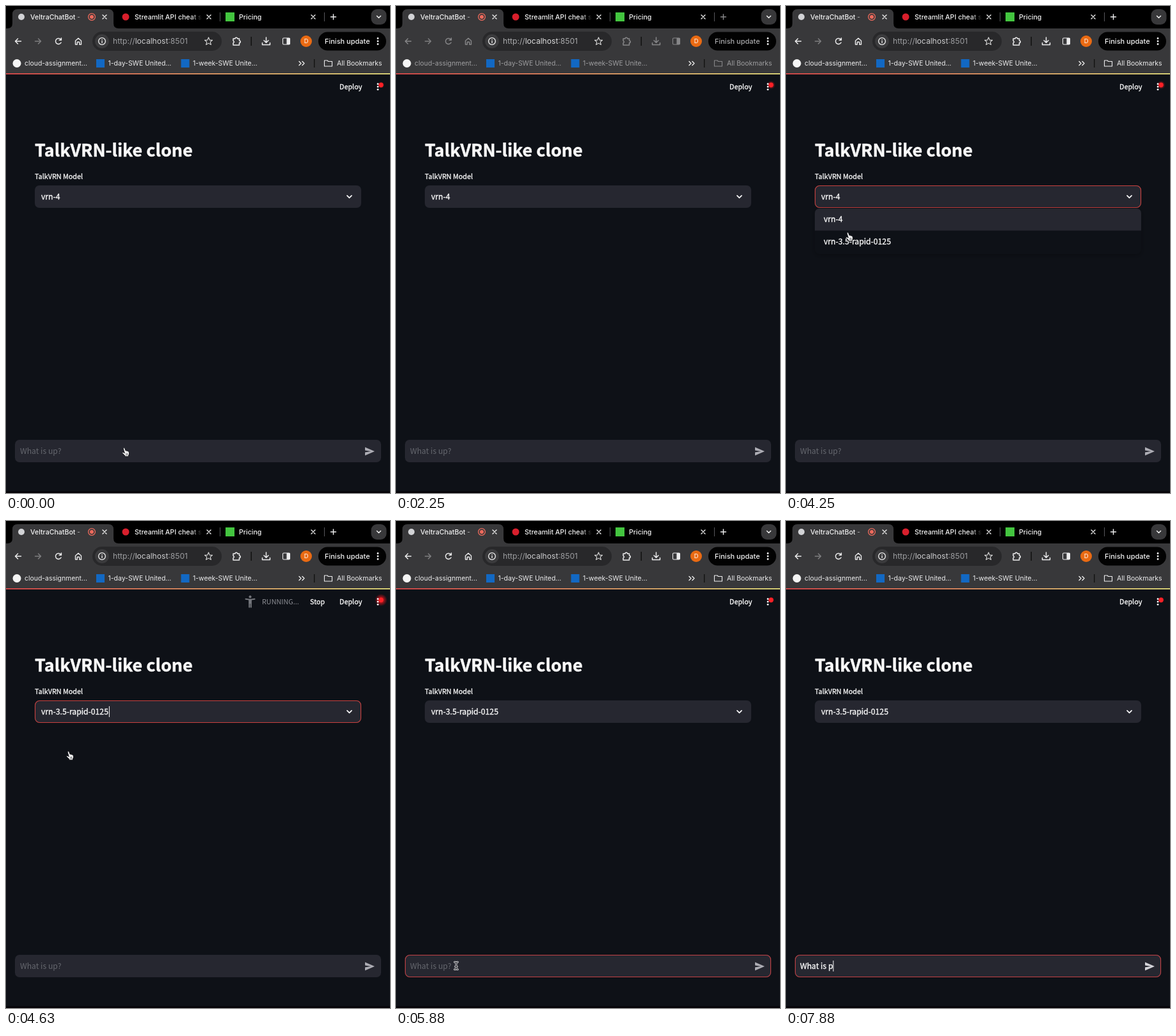
These frames come from a looping animation (600x760 px, 8000 ms). An HTML page with a canvas:

```html
<!DOCTYPE html>
<html lang="en">
<head>
<meta charset="utf-8">
<title>Chat clone demo</title>
<style>
  html, body { margin: 0; width: 100%; height: 100%; overflow: hidden; background: #000; }
  canvas { display: block; width: 600px; height: 760px; }
</style>
</head>
<body>
<canvas id="stage"></canvas>
<script>
const W = 600, H = 760, LOOP = 8000, STEP = 125;
const UI = 'Inter, Roboto, sans-serif';
const APP = '"Noto Sans CJK JP", "Noto Sans CJK SC", "Noto Sans CJK", "Noto Sans", sans-serif';
const PAGE = '#0e1117', FIELD = '#262730', BAR = '#38383a', INK = '#fafafa';
const BODY = 12.2, SMALL = 10.8;
const MODELS = ['vrn-4', 'vrn-3.5-rapid-0125'];

// Story times in ms
const BLUR = 750, REFOCUS = 2500;
const OPEN = 3625, HOVER = 4375, PICK = 4500, DONE = 5000, FOCUS_AT = 5375;
const KEYS = [6125, 6250, 6375, 6500, 6750, 6875, 7125, 7375, 7750];
const TYPED = 'What is p';

// Pointer path: time, x, y
const PATH = [
  [500, 187, 696], [875, 70, 716], [2375, 62, 690], [2875, 108, 331], [3125, 108, 331],
  [3500, 102, 302], [3750, 101, 306], [4250, 99, 360], [4500, 100, 366], [4875, 100, 366],
  [5375, 94, 694]
];

const canvas = document.getElementById('stage');
const ctx = canvas.getContext('2d');
const dpr = window.devicePixelRatio || 1;
canvas.width = W * dpr;
canvas.height = H * dpr;

function rect(x, y, w, h, color) {
  ctx.fillStyle = color;
  ctx.fillRect(x, y, w, h);
}

function box(x, y, w, h, r, fill, line) {
  if (fill) {
    ctx.beginPath();
    ctx.roundRect(x, y, w, h, r);
    ctx.fillStyle = fill;
    ctx.fill();
  }
  if (line) {
    ctx.beginPath();
    ctx.roundRect(x + 0.5, y + 0.5, w - 1, h - 1, r);
    ctx.strokeStyle = line;
    ctx.lineWidth = 1.1;
    ctx.stroke();
  }
}

function disc(x, y, r, color) {
  ctx.beginPath();
  ctx.arc(x, y, r, 0, 7);
  ctx.fillStyle = color;
  ctx.fill();
}

function ring(x, y, r, color, width = 1.2) {
  ctx.beginPath();
  ctx.arc(x, y, r, 0, 7);
  ctx.strokeStyle = color;
  ctx.lineWidth = width;
  ctx.stroke();
}

function text(str, x, y, size, color, family = APP, weight = 400) {
  ctx.font = `${weight} ${size}px ${family}`;
  ctx.fillStyle = color;
  ctx.fillText(str, x, y);
  return x + ctx.measureText(str).width;
}

// Page text, slightly emboldened with a hairline
function appText(str, x, y, size, color = INK, weight = 400) {
  const end = text(str, x, y, size, color, APP, weight);
  ctx.strokeStyle = color;
  ctx.lineWidth = 0.2 + size / 100;
  ctx.lineJoin = 'round';
  ctx.strokeText(str, x, y);
  return end;
}

function icon(x, y, d, color, { width = 1.5, fill = null } = {}) {
  const shape = new Path2D(d);
  ctx.save();
  ctx.translate(x, y);
  ctx.lineCap = ctx.lineJoin = 'round';
  if (fill) { ctx.fillStyle = fill; ctx.fill(shape); }
  if (color) { ctx.strokeStyle = color; ctx.lineWidth = width; ctx.stroke(shape); }
  ctx.restore();
}

function fade(from, to) {
  const g = ctx.createLinearGradient(from, 0, to, 0);
  g.addColorStop(0, '#f1f1f1');
  g.addColorStop(1, 'rgba(241,241,241,0)');
  return g;
}

const cross = x => icon(x, 17, 'M-3-3L3 3M3-3L-3 3', '#eee', { width: 1.4 });

function dots(x, y, gap, r, color) {
  for (let i = -1; i < 2; i++) disc(x, y + i * gap, r, color);
}

function drawTabs(tone) {
  rect(0, 0, W, 36, '#000');
  ctx.beginPath();
  ctx.moveTo(2, 35);
  ctx.quadraticCurveTo(10, 35, 10, 27);
  ctx.lineTo(10, 13);
  ctx.quadraticCurveTo(10, 5, 18, 5);
  ctx.lineTo(160, 5);
  ctx.quadraticCurveTo(168, 5, 168, 13);
  ctx.lineTo(168, 27);
  ctx.quadraticCurveTo(168, 35, 176, 35);
  ctx.fillStyle = BAR;
  ctx.fill();

  disc(24, 17, 5, '#d2d3d6');
  text('VeltraChatBot -', 38, 21, 10.6, fade(108, 121), UI, 500);
  ring(134, 17, 5.4, '#ee6a5c', 1.3);
  disc(134, 17, 3, '#ee6a5c');
  cross(154);

  disc(187, 17, 5.5, '#d81f2c');
  text('Streamlit API cheat sheet', 201, 21, 10.6, fade(290, 306), UI, 500);
  cross(317);
  rect(334, 10, 1, 14, '#55565a');

  rect(343, 10, 14, 14, '#43c53f');
  text('Pricing', 364, 21, 10.6, '#f1f1f1', UI, 500);
  cross(480);
  rect(497, 10, 1, 14, '#55565a');

  icon(511.5, 17, 'M-4 0H4M0-4V4', tone, { width: 1.5 });
  box(570.5, 5, 24, 24, 9, BAR);
  icon(582.5, 17, 'M-3-1.5L0 1.5L3-1.5', '#eee');
}

function drawToolbar(active, tone) {
  rect(0, 35, W, 70, BAR);
  icon(19, 55, 'M4.5 0H-4.5M-.5-4L-4.5 0L-.5 4', tone);
  icon(50, 55, 'M-4.5 0H4.5M.5-4L4.5 0L.5 4', '#7d7d7f');
  icon(82, 55, 'M4 2A4.5 4.5 0 1 1 3.4-3M4.4-5V-1.8H1.2', tone);
  icon(113, 55, 'M-4.5-.8L0-4.8L4.5-.8V5H1.7V1.2H-1.7V5H-4.5Z', tone, { width: 1.4 });

  box(135, 40, 202, 30, 15, '#28282a');
  disc(150, 55, 11, '#3b3b3d');
  ring(150, 55, 5.4, '#eee', 1.3);
  rect(149.4, 54, 1.3, 4, '#eee');
  rect(149.4, 51.8, 1.3, 1.3, '#eee');
  const dim = active ? '#9c9da0' : '#aaabad';
  let x = text('http://', 167, 59.3, 12.1, dim, UI);
  x = text('localhost', x, 59.3, 12.1, active ? '#cdcdcf' : '#dcdcdd', UI);
  text(':8501', x, 59.3, 12.1, dim, UI);
  icon(316.5, 55, 'M0-6L1.7-1.9L6-1.6L2.7 1.2L3.8 5.4L0 3.1L-3.8 5.4L-2.7 1.2L-6-1.6L-1.7-1.9Z', '#ddd', { width: 1.1 });

  icon(360, 55, 'M-5-4H-2A1.8 1.8 0 0 1 1.6-4H4.5V-1A1.8 1.8 0 0 1 4.5 2.6V6H-5V2.8A1.9 1.9 0 0 0-5-.8Z', tone);
  rect(382.5, 48, 1.5, 14, '#111');
  icon(406.5, 55, 'M0-6V2M-3.5-1.2L0 2.3L3.5-1.2M-6 2.5V5.5H6V2.5', tone);
  box(432, 49.5, 12, 11, 1.5, null, tone);
  rect(438.5, 50, 5, 10, tone);
  disc(469, 55, 9, '#ea6a12');
  text('D', 465.7, 58.4, 9.4, '#fff', UI);

  box(488, 40.5, 106, 29, 14.5, '#020202');
  text('Finish update', 498, 59, 11, active ? '#f4f4f4' : '#a9a9ab', UI, 500);
  dots(581, 55, 4.5, 1.4, '#f1f1f1');
}

function drawBookmarks(active, tone) {
  const ink = active ? '#ededee' : '#9d9d9f';
  disc(17, 89.5, 6.5, '#f5f5f5');
  rect(141, 83, 13, 13, '#1268c3');
  rect(273.5, 83, 13, 13, '#1268c3');
  text('cloud-assignment...', 29, 93, 10.45, ink, UI);
  text('1-day-SWE United...', 159.5, 93, 10.45, ink, UI);
  text('1-week-SWE Unite...', 292, 93, 10.45, ink, UI);
  icon(462, 89.5, 'M-4-3L-1 0L-4 3M1-3L4 0L1 3', '#eee', { width: 1.4 });
  rect(481, 83, 1.5, 13, '#141414');
  icon(503.5, 89.5, 'M-6-4.5H-1.5L0-3H6V4.5H-6Z', tone, { width: 1.1 });
  text('All Bookmarks', 517, 93, 10.45, ink, UI);
}

function drawHeader(t) {
  const g = ctx.createLinearGradient(0, 0, W, 0);
  g.addColorStop(0, '#f04d4e');
  g.addColorStop(1, '#fbf385');
  rect(0, 105, W, 1.6, g);
  appText('Deploy', 521, 130, SMALL);
  if (t >= PICK && t < DONE) {
    const grey = '#74767c';
    disc(381.5, 118.3, 2, grey);
    icon(381.5, 126, 'M-7-4.2L-2-3.4H2L7-4.2M-1.3-3.4V8.5M1.3-3.4V8.5', grey, { width: 2 });
    rect(379.5, 122, 4, 7, grey);
    text('RUNNING...', 400, 130, SMALL, '#8c8e94');
    appText('Stop', 475, 130, SMALL);
  }

  // Pulsing record light
  const pulse = 0.5 - 0.5 * Math.cos((t + 120) / 2000 * Math.PI * 2);
  const r = 5 + 5.5 * pulse;
  const glow = ctx.createRadialGradient(586, 123.3, 2, 586, 123.3, r);
  glow.addColorStop(0, `rgba(255,25,30,${0.5 + 0.4 * pulse})`);
  glow.addColorStop(1, 'rgba(255,20,30,0)');
  disc(586, 123.3, r, glow);
  disc(586, 123.3, 3.7, '#fb2026');
  dots(581, 126, 4.3, 1.4, INK);
}

const blinkOn = (t, since) => Math.floor((t - since) / 500) % 2 === 0;

function drawSelect(t) {
  appText('TalkVRN-like clone', 45, 234.7, 26.9, INK, 700);
  appText('TalkVRN Model', 45, 270, SMALL);
  const focused = t >= OPEN && t < FOCUS_AT;
  box(45, 280, 510, 35, 7, FIELD, focused ? '#c9413f' : null);
  const picked = t >= PICK;
  const end = appText(MODELS[picked ? 1 : 0], 55, 302.3, BODY);
  if (focused && blinkOn(t, picked ? PICK : OPEN)) rect(end + 1, 289, 1, 17, INK);
  icon(536.5, 297.5, 'M-3.5-1.7L0 1.8L3.5-1.7', INK, { width: 1.7 });

  if (t >= OPEN && !picked) {
    ctx.save();
    ctx.shadowColor = 'rgba(0,0,0,.25)';
    ctx.shadowBlur = 8 * dpr;
    ctx.shadowOffsetY = 2 * dpr;
    box(45, 316, 510, 71, 7, PAGE);
    ctx.restore();
    const row = t >= HOVER ? 1 : 0;
    box(45, 316 + row * 34.5, 510, 34.5, row ? 0 : [7, 7, 0, 0], FIELD);
    MODELS.forEach((name, i) => appText(name, 59, 337.4 + i * 34.7, BODY));
  }
}

function drawInput(t) {
  const typed = TYPED.slice(0, KEYS.filter(k => t >= k).length);
  const focused = t >= FOCUS_AT;
  box(14, 677, 572, 35, 7, FIELD, focused ? '#c24145' : null);
  const end = typed
    ? appText(typed, 22, 699, BODY)
    : (text('What is up?', 22, 699, BODY, '#65676e'), 22);
  const last = KEYS[typed.length - 1] ?? FOCUS_AT - 60;
  if (focused && blinkOn(t, last)) rect(end, 686, 1, 17, INK);
  icon(568, 695, 'M-7-6.5L8 0L-7 6.5V1.5L2 0L-7-1.5Z', null, { fill: typed ? '#d4d4d9' : '#adadb4' });
}

function drawPointer(t) {
  if ((t >= 875 && t < 2375) || t >= KEYS[0]) return;
  let [, x, y] = PATH[0];
  for (let i = 1; i < PATH.length; i++) {
    const [t0, x0, y0] = PATH[i - 1], [t1, x1, y1] = PATH[i];
    if (t < t0) break;
    const p = Math.min(1, (t - t0) / (t1 - t0)), e = p * p * (3 - 2 * p);
    x = x0 + (x1 - x0) * e;
    y = y0 + (y1 - y0) * e;
  }
  const arrow = (t >= 2375 && t < 3375) || (t >= 4875 && t < 5250);
  if (arrow) {
    icon(x, y, 'M-3-6.5V5L-.4 2.7L1.4 7L3.4 6.1L1.7 2H5Z', '#c9c9cc', { width: 1.1, fill: '#121318' });
  } else if (t >= 5250) {
    const beam = 'M-2.4-5.8Q0-5.8 0-4Q0-5.8 2.4-5.8M0-4V4M-2.4 5.8Q0 5.8 0 4Q0 5.8 2.4 5.8M-1.3 1.2H1.3';
    icon(x, y, beam, '#d0d0d3', { width: 3 });
    icon(x, y, beam, '#1a1b20', { width: 1 });
  } else {
    const hand = 'M-3.8-5.8Q-2.4-7.6-1.3-5.6L.2-1.9Q1.4-2.8 2.2-1.5Q3.3-2.1 4-.9Q5.2-1 5.4.8Q5.8 3.7 4.6 5V7H-1.3V5.5L-5.4 1.8Q-5.7-.1-3.8.5L-2 1.5Z';
    icon(x, y, hand, '#15161b', { width: 1, fill: '#f2f2f2' });
    icon(x, y, 'M.8 2.2V5M2.5 2.2V5', '#33343a', { width: 0.7 });
  }
}

function draw(t) {
  const active = t < BLUR || t >= REFOCUS;
  const tone = active ? '#ececed' : '#868688';
  ctx.setTransform(dpr, 0, 0, dpr, 0, 0);
  rect(0, 0, W, H, PAGE);
  drawTabs(tone);
  drawToolbar(active, tone);
  drawBookmarks(active, tone);
  drawHeader(t);
  drawSelect(t);
  drawInput(t);
  rect(0, 757.5, W, 2.5, '#050307');
  drawPointer(t);
}

const start = performance.now();
function tick(now) {
  const t = Math.max(0, now - start) % LOOP;
  draw(t < 500 ? 0 : Math.floor((t + 6) / STEP) * STEP);
  requestAnimationFrame(tick);
}
requestAnimationFrame(tick);
</script>
</body>
</html>
```
